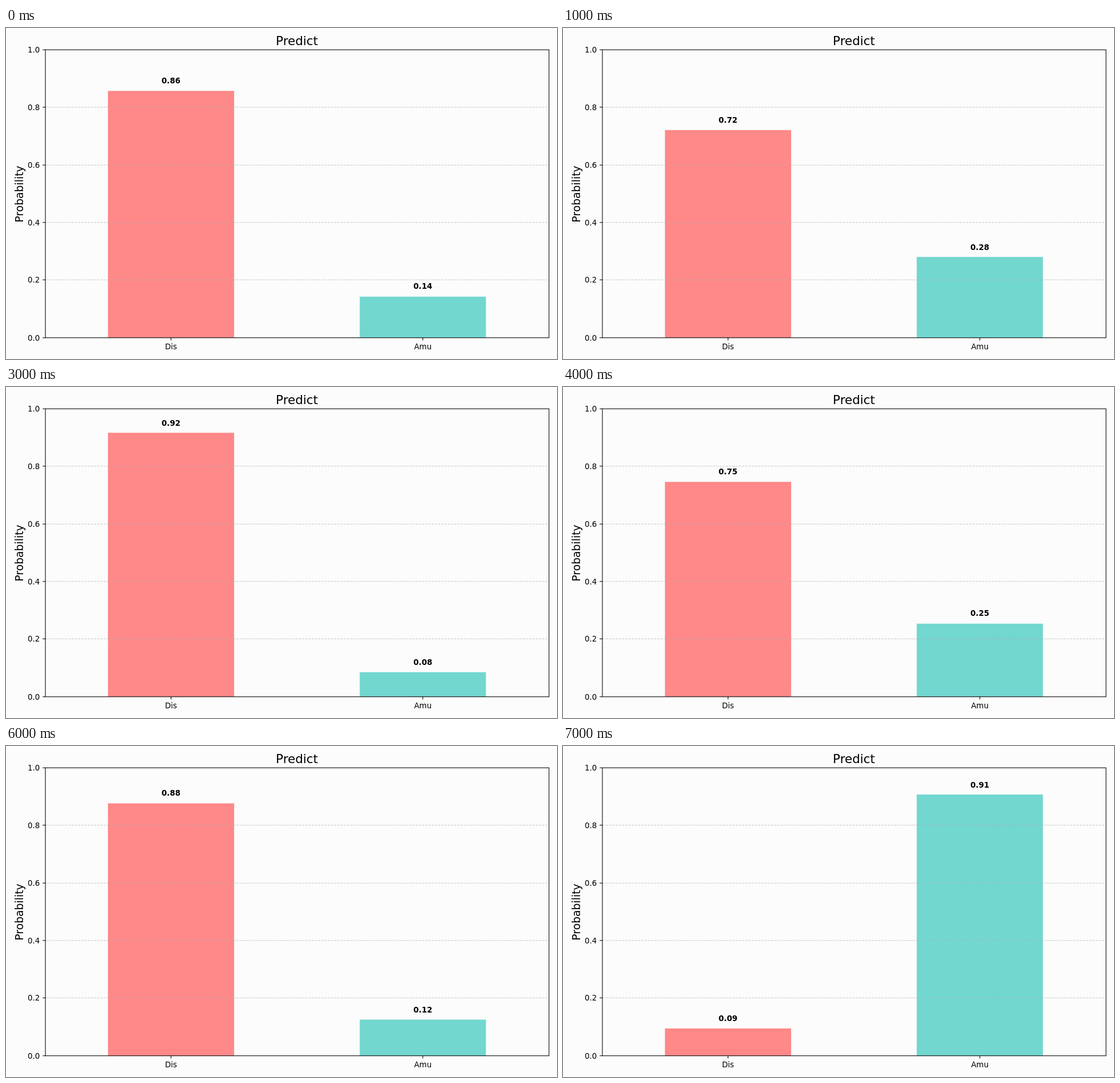
Recreate the animation shown at these times as an HTML page with a canvas. Size 966 by 580 pixels, loop 8 s.

```html
<!DOCTYPE html>
<html lang="en">
<head>
<meta charset="utf-8">
<title>Predict</title>
<style>
  html, body { margin: 0; width: 100%; height: 100%; overflow: hidden; background: #fcfcfc; }
  canvas { display: block; }
</style>
</head>
<body>
<canvas id="chart" width="966" height="580"></canvas>
<script>
const ctx = document.getElementById('chart').getContext('2d');
const STEP_MS = 1000;
const FONT = '"DejaVu Sans", sans-serif';

// Probability of the first class, one value per step.
const probabilities = [0.857, 0.72, 0.065, 0.916, 0.746, 0.8745, 0.876, 0.094];

// The chart is laid out on a 1000 x 600 figure and scaled to the stage.
const axes = { left: 71.5, right: 985.5, top: 39.5, bottom: 561.5 };
const bars = [
  { name: 'Dis', color: '#ff8888', left: 185, right: 414, center: 299.5 },
  { name: 'Amu', color: '#72d7cf', left: 642, right: 871, center: 756.5 }
];

const valueY = p => 561.2 - 522 * p;
const snap = y => Math.floor(y) + 0.5;

function text(str, x, y, size, align = 'center', weight = '') {
  ctx.font = `${weight} ${size}px ${FONT}`;
  ctx.textAlign = align;
  ctx.fillStyle = '#000';
  ctx.fillText(str, x, y);
}

function line(x1, y1, x2, y2) {
  ctx.beginPath();
  ctx.moveTo(x1, y1);
  ctx.lineTo(x2, y2);
  ctx.stroke();
}

function drawBar(bar, p) {
  const y = valueY(p);
  const top = Math.round(y);
  ctx.fillStyle = bar.color;
  ctx.fillRect(bar.left, top, bar.right - bar.left, axes.bottom - top);
  text(p.toFixed(2), bar.center, Math.round(y - 13.45), 13.89, 'center', 'bold');
}

function drawGrid() {
  ctx.strokeStyle = 'rgba(176, 176, 176, 0.7)';
  ctx.setLineDash([4.11, 1.78]);
  for (let i = 1; i < 5; i++) {
    const y = snap(valueY(i / 5));
    line(axes.left, y, axes.right, y);
  }
  ctx.setLineDash([]);
}

function drawAxes() {
  const { left, right, top, bottom } = axes;
  ctx.strokeStyle = '#000';
  ctx.strokeRect(left, top, right - left, bottom - top);
  for (let i = 0; i <= 5; i++) {
    const y = snap(valueY(i / 5));
    line(left - 5, y, left, y);
    text((i / 5).toFixed(1), 61.3, y + 5.2, 13.89, 'right');
  }
  for (const bar of bars) {
    line(bar.center, bottom, bar.center, bottom + 5);
    text(bar.name, bar.center, 582, 13.89);
  }
  text('Predict', 528, 31, 22.22);
  ctx.save();
  ctx.translate(31, 301);
  ctx.rotate(-Math.PI / 2);
  text('Probability', 0, 0, 19.44);
  ctx.restore();
}

function draw(now) {
  const p = probabilities[Math.floor(now / STEP_MS) % probabilities.length];
  ctx.setTransform(0.966, 0, 0, 580 / 600, 0, 0);
  ctx.fillStyle = '#fcfcfc';
  ctx.fillRect(0, 0, 1000, 600);
  ctx.lineWidth = 1.11;
  drawBar(bars[0], p);
  drawBar(bars[1], Number((1 - p).toFixed(4)));
  drawGrid();
  drawAxes();
}

const start = performance.now();
function tick() {
  draw(performance.now() - start);
  requestAnimationFrame(tick);
}
tick();
</script>
</body>
</html>
```
